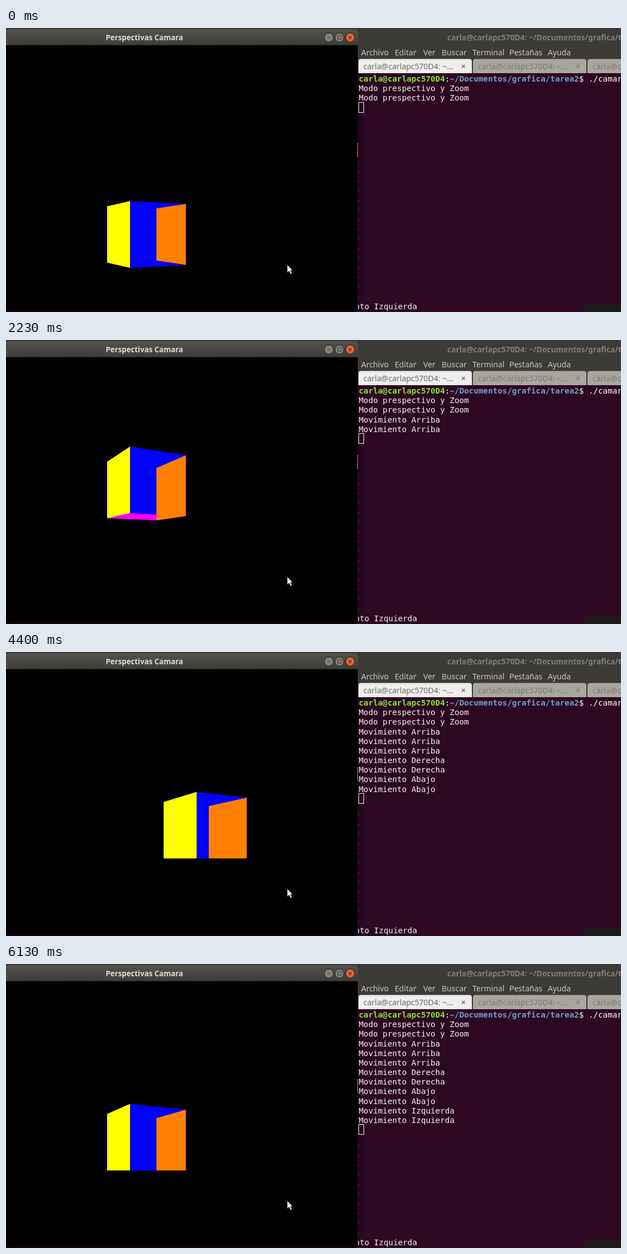
These frames come from a looping animation (1101x509 px, 6.16 s). An HTML page:

```html
<!DOCTYPE html>
<html lang="es">
<head>
<meta charset="utf-8">
<title>Perspectivas Camara</title>
<style>
html, body { margin: 0; width: 100%; height: 100%; overflow: hidden; background: #000; }
svg { display: block; width: 1101px; height: 509px; }
text { white-space: pre; }
.ui { font: 14px "Noto Sans", "Open Sans", sans-serif; }
.title { font: 700 13.28px "Noto Sans", "Open Sans", sans-serif; }
.mono { font: 14.24px "DejaVu Sans Mono", monospace; fill: #f4f1f3; }
</style>
</head>
<body>
<svg viewBox="0 0 1101 509" xmlns="http://www.w3.org/2000/svg">
  <defs>
    <linearGradient id="bar" x2="0" y2="1">
      <stop offset="0" stop-color="#5b5953"/><stop offset=".12" stop-color="#504e48"/><stop offset="1" stop-color="#3e3d38"/>
    </linearGradient>
    <linearGradient id="shade">
      <stop offset="0" stop-color="#000" stop-opacity=".3"/><stop offset="1" stop-color="#000" stop-opacity="0"/>
    </linearGradient>
    <clipPath id="term"><rect x="628" y="81" width="473" height="428"/></clipPath>
  </defs>

  <rect width="1101" height="509" fill="#3c3b37"/>
  <rect x="628" y="81" width="473" height="428" fill="#2d0820"/>
  <rect x="630" y="81" width="9" height="428" fill="url(#shade)"/>
  <text class="title" x="790" y="22" fill="#827f79" style="font-size:13.8px">carla@carlapc570D4: ~/Documentos/grafica/tarea2</text>
  <g id="menu" class="ui" fill="#c9c5bd"></g>
  <g id="tabs" class="ui"></g>
  <g clip-path="url(#term)">
    <g id="dots" fill="#a79ca4"></g>
    <g id="log" class="mono"></g>
    <text class="mono" x="624.6" y="504">nto Izquierda</text>
    <rect id="caret" x="631.5" width="9" height="18" fill="none" stroke="#f4f1f3"/>
  </g>
  <path d="M1035 509V497q0-2 2-2H1101V509Z" fill="#1d1a1b"/>

  <rect y="31" width="629" height="474" fill="#000"/>
  <rect y="504.5" width="628" height="4.5" fill="#12030d"/>
  <rect x="629" y="31" width="1" height="474" fill="#1a0513"/>
  <path d="M629.5 206v12m0 1v12" stroke="#a79ca4"/>
  <path d="M0 3H624q6 0 6 6V31H0Z" fill="url(#bar)"/>
  <path d="M0 30.5H630" stroke="#2b2a27"/>
  <text class="title" x="178.5" y="22" fill="#dfdbd2">Perspectivas Camara</text>
  <g stroke="#2f2e2a">
    <circle cx="578" cy="17" r="7.8" fill="#85827a"/>
    <circle cx="597" cy="17" r="7.8" fill="#85827a"/>
    <circle cx="616" cy="17" r="7.8" fill="#ec6237"/>
    <path d="M574.5 17h7M594 14h6v6h-6ZM613.5 14.5l5 5m0-5l-5 5" fill="none" stroke="#3a3833" stroke-width="1.2"/>
  </g>

  <g id="box"></g>
  <path d="M503.5 424V438.5L506.9 435.4 509.2 440.6 511.7 439.5 509.4 434.4H513Z" fill="#fff" stroke="#222" stroke-width=".7"/>
</svg>
<script>
const LOOP = 6160, ROW = 17.17, HORIZON = 370;
const $ = id => document.getElementById(id);

function add(parent, tag, attrs, text) {
  const el = document.createElementNS('http://www.w3.org/2000/svg', tag);
  for (const k in attrs) el.setAttribute(k, attrs[k]);
  if (text) el.textContent = text;
  parent.appendChild(el);
  return el;
}

[['Archivo', 636], ['Editar', 696], ['Ver', 747], ['Buscar', 780], ['Terminal', 835],
  ['Pestañas', 901], ['Ayuda', 970]].forEach(([s, x]) => add($('menu'), 'text', { x, y: 49 }, s));

[631, 836, 1041].forEach((x, i) => {
  const ink = i ? '#7b7872' : '#6d6a66';
  add($('tabs'), 'path', { d: `M${x} 81V60q0-4.5 4.5-4.5h194q4.5 0 4.5 4.5v21Z`, fill: i ? '#a9a6a0' : '#f0eeee' });
  add($('tabs'), 'text', { x: x + 9, y: 74, fill: ink }, 'carla@carlapc570D4: ~...');
  add($('tabs'), 'path', { d: `M${x + 185} 66l5.5 5.5m0-5.5l-5.5 5.5`, stroke: ink, 'stroke-width': 1.3 });
});

const rowText = i => ({ x: 631.5, y: 96 + ROW * i });
const prompt = add($('log'), 'text', rowText(0));
[['carla@carlapc570D4', '#8ae234', 700], [':', '#fff', 400], ['~/Documentos/grafica/tarea2', '#729fcf', 700],
  ['$ ./camara', '#fff', 400]].forEach(([s, fill, weight]) =>
  add(prompt, 'tspan', { fill, 'font-weight': weight }, s));
[1, 2].forEach(i => add($('log'), 'text', rowText(i), 'Modo prespectivo y Zoom'));

// Key presses: time, direction, horizontal and vertical step
const moves = [
  [670, 'Arriba', 0, 1], [1600, 'Arriba', 0, 1], [2700, 'Arriba', 0, 1],
  [3360, 'Derecha', 1, 0], [3640, 'Derecha', 1, 0],
  [4050, 'Abajo', 0, -1], [4300, 'Abajo', 0, -1],
  [4770, 'Izquierda', -1, 0], [5430, 'Izquierda', -1, 0]
];
const lines = moves.map((m, i) => add($('log'), 'text', rowText(i + 3), 'Movimiento ' + m[1]));

const dots = [];
for (let row = 8; row < 23; row++)
  dots.push([row, add($('dots'), 'rect', { x: 629, y: 90 + ROW * (row + .7), width: 1.6, height: 2 })]);

// Vertical edges of the box: x at rest, projected height
const A = [222, 119.3], B = [322, 109], C = [269.3, 93.7], D = [181, 101.2];
const face = fill => add($('box'), 'polygon', { fill });
const floor = face('#f0f'), blue = face('#00f'), yellow = face('#ff0'), orange = face('#ff8000');

function render(t) {
  const done = moves.filter(m => t >= m[0]);
  const px = done.reduce((s, m) => s + m[2], 0);
  const py = done.reduce((s, m) => s + m[3], 0);
  const point = ([x, h], up) => [x + h * px / 2, HORIZON + h * ((1 - py) / 2 - up)].join();
  const wall = (el, p, q) =>
    el.setAttribute('points', [point(p, 0), point(p, 1), point(q, 1), point(q, 0)].join(' '));

  floor.setAttribute('points', [A, B, C, D].map(p => point(p, 0)).join(' '));
  wall(blue, A, B);
  wall(yellow, D, A);
  wall(orange, C, B);

  const row = done.length + 3;
  lines.forEach((el, i) => el.setAttribute('visibility', i < done.length ? 'visible' : 'hidden'));
  dots.forEach(([r, el]) => el.setAttribute('visibility', r > row ? 'visible' : 'hidden'));
  $('caret').setAttribute('y', Math.round(91 + ROW * row - 9) - .5);
}

const start = performance.now();
function tick() {
  render((performance.now() - start) % LOOP);
  requestAnimationFrame(tick);
}
tick();
</script>
</body>
</html>
```
